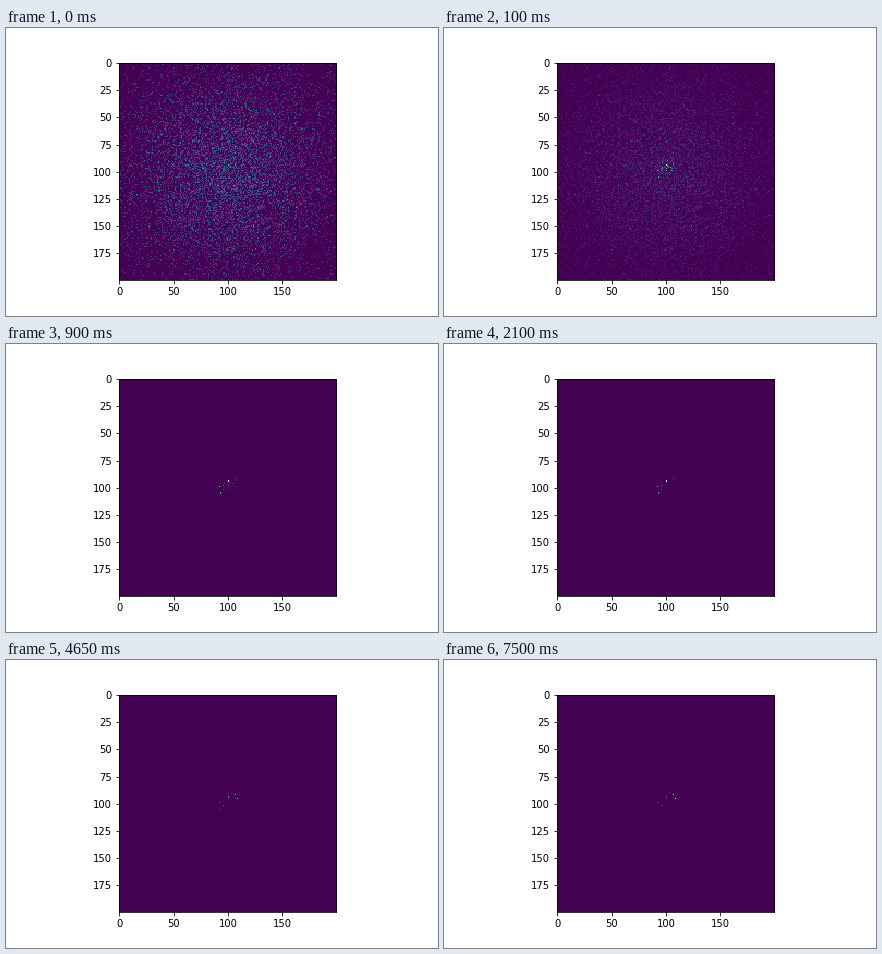
Animation of 432 by 288 pixels, one loop 8000 ms. Source, as a matplotlib script:

```python
import matplotlib.pyplot as plt
import numpy as np
from matplotlib.animation import FuncAnimation

SIZE = 200
INTERVAL = 50
FRAMES = 160
rng = np.random.default_rng(11)

# Initial population: counts of normally scattered individuals per cell
edges = np.arange(SIZE + 1)
points = rng.normal(SIZE / 2, 54, (2, 11000))
counts = np.histogram2d(*points, bins=(edges, edges))[0]

# Fitness favors lucky cells close to the middle
rows, cols = np.mgrid[:SIZE, :SIZE]
distance = np.hypot(rows - 97, cols - 100)
fitness = rng.random((SIZE, SIZE)) * np.exp(-(distance / 12) ** 2)
fitness[(distance > 9) | (counts == 0)] = 0

# Lasting cells: column, row, early share, late share;
# a share above 1 takes the colormap's "over" color.
LASTING = [
    (100, 94, 1.5, 0.3),
    (106, 92, 0.4, 0.95),
    (108, 95, 0.05, 1.0),
    (92, 99, 0.9, 0.5),
    (95, 98, 0.55, 0.0),
    (95, 102, 0.3, 0.45),
    (93, 105, 0.7, 0.0),
]


def change_times():
    """Changes come at every frame at first, then ever more rarely."""
    times, time = [], 0
    while time < FRAMES * INTERVAL:
        times.append(time)
        time += INTERVAL * (1 + time // 1050)
    return np.array(times)


CHANGES = change_times()


def smoothstep(value, start, end):
    u = np.clip((value - start) / (end - start), 0, 1)
    return u * u * (3 - 2 * u)


def population(frame):
    time = CHANGES[CHANGES <= frame * INTERVAL].max()
    step = time / INTERVAL
    rise = min(1, 0.5 + 0.5 * step)
    cloud = counts / 6 * 0.75 ** (step ** 1.6)
    core = rise * fitness ** (1.5 + 0.4 * step) * max(0, 1 - time / 2800)
    shares = np.maximum(cloud, core)
    late = smoothstep(time, 900, 6000)
    for col, row, first, last in LASTING:
        shares[row, col] = rise * (first + (last - first) * late)
    return shares


plt.rcParams.update({"font.family": "DejaVu Sans", "font.size": 10})
fig, ax = plt.subplots(figsize=(6, 4), dpi=72, facecolor="white")
fig.subplots_adjust(left=0.125, right=0.9, bottom=0.125, top=0.88)
cmap = plt.get_cmap("viridis").copy()
cmap.set_over("#f4f0f0")
image = ax.imshow(population(0), cmap=cmap, vmin=0, vmax=1,
                  interpolation="nearest")
ax.set_xticks(range(0, SIZE, 50))
ax.set_yticks(range(0, SIZE, 25))


def update(frame):
    image.set_data(population(frame))
    return [image]


anim = FuncAnimation(fig, update, frames=FRAMES, interval=INTERVAL,
                     repeat=True, repeat_delay=0)
plt.show()
```
